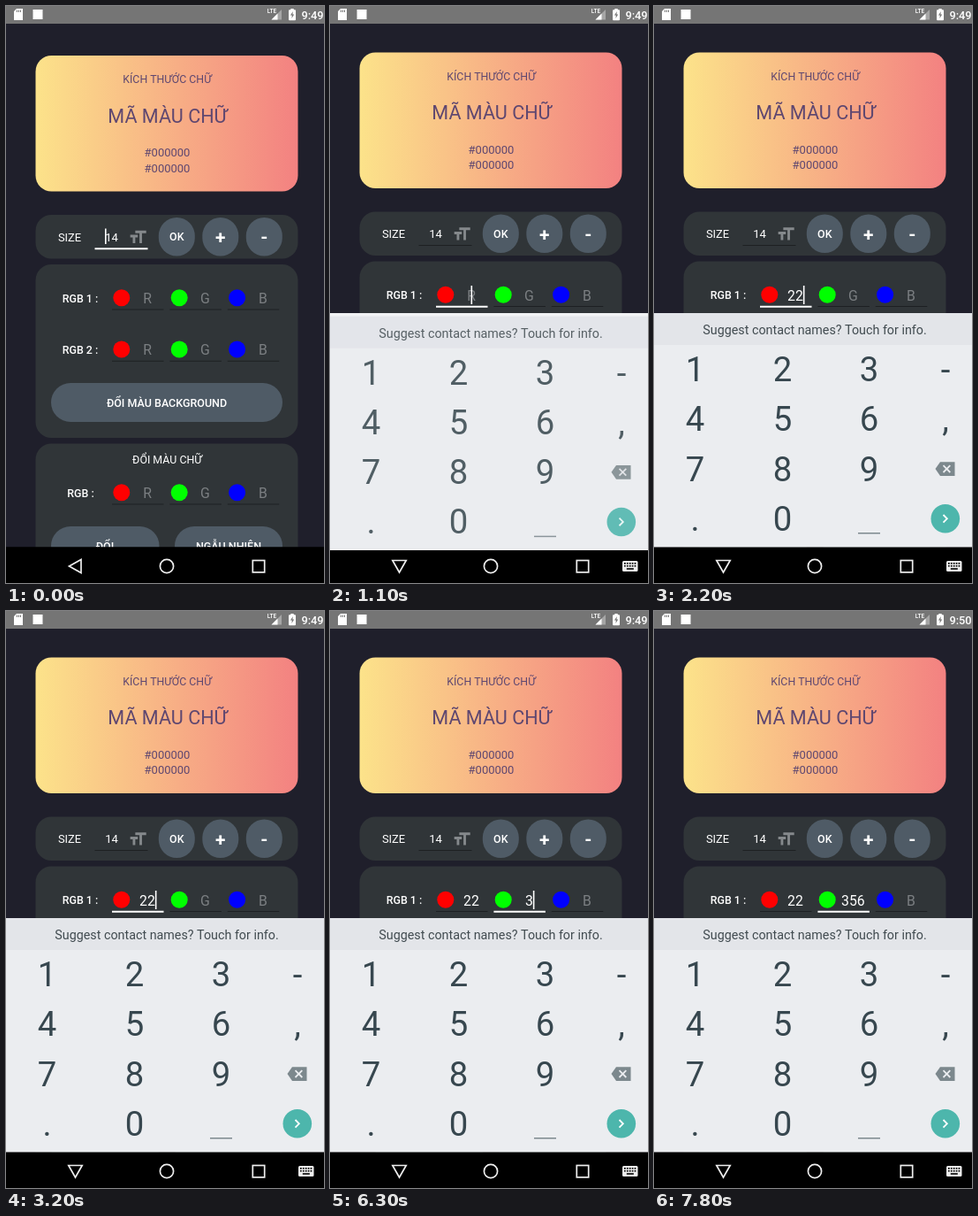
An HTML page with a canvas for the animation above (8000 ms loop, 360 by 652 pixels).

```html
<!DOCTYPE html>
<html lang="vi">
<head>
<meta charset="utf-8">
<style>
html, body { margin: 0; width: 100%; height: 100%; overflow: hidden; background: #1f1f2b; }
canvas { display: block; width: 360px; height: 652px; }
</style>
</head>
<body>
<canvas id="stage"></canvas>
<script>
const LOOP = 8000, STEP = 100;           // the screen refreshes ten times a second
const SLIDE_AT = 1034, SLIDE_FOR = 200;  // keyboard entrance
const canvas = document.getElementById('stage');
const dpr = window.devicePixelRatio || 1;
canvas.width = 360 * dpr;
canvas.height = 652 * dpr;
const c = canvas.getContext('2d');

const PANEL = '#303538', BUTTON = '#4f5b66', WHITE = '#fff', INK = '#37474f', PLUM = '#5f4770';
const KEYS = '#ebedf0';

// [time, focused field, R text, G text]; each one restarts the caret blink
const edits = [
  [0, 'size', '', ''], [1000, 'r', '', ''], [2000, 'r', '2', ''], [2200, 'r', '22', ''],
  [5600, 'g', '22', ''], [6300, 'g', '22', '3'], [6800, 'g', '22', '35'], [7100, 'g', '22', '356']
];
// [time, column, row]; a key stays lit for one step
const presses = [[1900, 1, 0], [2100, 1, 0], [6200, 2, 0], [6700, 1, 1], [7000, 2, 1]];

function box(x, y, w, h, color, r = 0) {
  c.fillStyle = color;
  c.beginPath();
  c.roundRect(x, y, w, h, r);
  c.fill();
}

function disc(x, y, r, color) {
  c.fillStyle = color;
  c.beginPath();
  c.arc(x, y, r, 0, 7);
  c.fill();
}

function poly(points, fill, stroke, width = 2, close = true) {
  c.beginPath();
  for (let i = 0; i < points.length; i += 2) c.lineTo(points[i], points[i + 1]);
  if (close) c.closePath();
  if (fill) { c.fillStyle = fill; c.fill(); }
  if (stroke) { c.strokeStyle = stroke; c.lineWidth = width; c.stroke(); }
}

// Centres the text on x and its capitals on y
function label(s, x, y, size, color = WHITE, weight = 400) {
  c.font = `${weight} ${size}px Roboto, sans-serif`;
  c.fillStyle = color;
  c.textAlign = 'center';
  c.fillText(s, x, y + size * 0.356);
  return c.measureText(s).width;
}

function underline(x, y, w, active) {
  if (active) box(x, y - 0.7, w, 2, WHITE);
  else box(x, y - 0.5, w, 1, '#1d2022');
}

function rgbRow(title, x, y, state) {
  label(title, x, y + 0.3, 12.4, WHITE, 500);
  ['r', 'g', 'b'].forEach((key, i) => {
    const left = 120 + i * 65.4, mid = left + 40;
    disc(left + 10.8, y - 0.3, 9.5, ['#f00', '#0f0', '#00f'][i]);
    const text = state && state[key];
    const active = state && state.focus === key;
    const w = label(text || key.toUpperCase(), mid, y + 0.4, 15.8, text ? WHITE : '#7b7f82');
    underline(left, y + 13, 58.5, active);
    if (active && state.caret) box(mid + (text ? w / 2 : -0.5), y - 10.5, 1.6, 21, WHITE);
  });
}

function page(state) {
  const grad = c.createLinearGradient(33, 0, 331, 0);
  grad.addColorStop(0, '#fce38a');
  grad.addColorStop(1, '#f38181');
  box(33.5, 56, 297, 153.5, grad, 18);
  label('KÍCH THƯỚC CHỮ', 182.5, 83, 12.3, PLUM);
  label('MÃ MÀU CHỮ', 183, 124, 21.6, PLUM);
  label('#000000', 182.5, 165.5, 13, PLUM);
  label('#000000', 182.5, 183, 13, PLUM);

  box(33.5, 236, 297, 49.5, PANEL, 18);
  label('SIZE', 72, 261, 12.9);
  label('14', 119.5, 261, 13.1);
  c.save();
  c.translate(137.8, 250);
  c.scale(0.95, 0.95);
  c.fillStyle = '#85898c';
  c.fill(new Path2D('M9 4v3h5v12h3V7h5V4H9zM3 12h3v7h3v-7h3V9H3z'));
  c.restore();
  const sizing = state.focus === 'size';
  underline(100.5, 274, 60, sizing);
  if (sizing && state.caret) box(112, 251.5, 1.6, 17.5, WHITE);
  ['OK', '+', '-'].forEach((s, i) => {
    const x = 193.3 + i * 49.5;
    box(x - 20.5, 239, 41, 43.5, BUTTON, 20.5);
    label(s, x, 261, i ? 21 : 12.4, WHITE, i ? 700 : 500);
  });

  box(33.5, 292, 297, 196, PANEL, 18);
  rgbRow('RGB 1 :', 84, 330, state);
  rgbRow('RGB 2 :', 84, 388.3);
  box(51, 426, 262, 44, BUTTON, 22);
  label('ĐỔI MÀU BACKGROUND', 182, 448.5, 12.5, WHITE, 500);

  box(33.5, 494.5, 297, 180, PANEL, 18);
  label('ĐỔI MÀU CHỮ', 182.5, 513, 12.4);
  rgbRow('RGB :', 84.5, 550);
  box(51, 588, 122.5, 44, BUTTON, 22);
  box(191, 588, 122, 44, BUTTON, 22);
  label('ĐỔI', 112, 610.5, 12.5, WHITE, 500);
  label('NGẪU NHIÊN', 252, 610.5, 12.5, WHITE, 500);
}

function statusBar(t) {
  box(0, 0, 360, 20, '#757575');
  poly([12, 3, 19, 3, 19, 16, 9, 16, 9, 6], WHITE);
  for (let i = 0; i < 3; i++) box(12 + i * 2, 4.5, 1, 2.5, '#757575');
  box(30.5, 4, 11, 11, WHITE);
  poly([312, 4, 312, 15.5, 300.5, 15.5], '#a6a6a6');
  poly([307.5, 8.5, 307.5, 15.5, 300.5, 15.5], WHITE);
  label('LTE', 301, 6, 6.6, WHITE, 500);
  box(320, 4.2, 8, 12, WHITE, 1);
  box(322.3, 3, 3.4, 2, WHITE);
  poly([324.8, 6, 322, 10.6, 323.8, 10.6, 323.4, 14, 326.2, 9.6, 324.4, 9.6], '#757575');
  label(t < 6700 ? '9:49' : '9:50', 347, 10, 12.8, WHITE, 500);
}

function navIcons(typing) {
  poly(typing ? [70.8, 626.5, 86.2, 626.5, 78.5, 640] : [71.5, 633, 85, 625.5, 85, 640.5], null, '#eee', 1.7);
  c.beginPath();
  c.arc(182, 633, 7.6, 0, 7);
  c.stroke();
  c.strokeRect(279.3, 626.5, 13.4, 13.4);
  if (!typing) return;
  box(331, 627, 17.5, 12, '#eee', 1.5);
  for (let i = 0; i < 10; i++) box(333 + i % 5 * 2.9, 629 + (i > 4) * 2.9, 1.7, 1.7, '#000');
  box(335.8, 635.2, 8, 1.6, '#000');
}

function keyboard(t) {
  const left = Math.max(0, 1 - (t - SLIDE_AT) / SLIDE_FOR) ** 5;
  const shift = 27 * left;
  box(0, 347, 360, 264.3 + shift, '#f1f2f4');
  c.save();
  c.translate(0, shift);
  c.globalAlpha = 1 - left;
  box(0, 347, 360, 264.3, KEYS);
  box(0, 347, 360, 36, '#e3e5e9');
  label('Suggest contact names? Touch for info.', 182, 366, 14.3, '#414b50');
  for (const [at, col, row] of presses)
    if (t >= at && t < at + STEP) box(col * 99, 388.5 + row * 56.2, 92, 43.5, '#d0d4d8');

  ['123-', '456,', '789', '.0'].forEach((keys, row) => [...keys].forEach((k, col) =>
    label(k, [46.5, 145.5, 243.5, 330][col], 410.5 + row * 56.2, 38.3, INK)));
  box(231, 595, 25, 1.5, '#7d898e');
  poly([318.5, 523, 324, 515.3, 340.5, 515.3, 340.5, 531, 324, 531], '#7c888d');
  poly([327.5, 519.2, 335.3, 527], null, KEYS, 1.8, false);
  poly([335.3, 519.2, 327.5, 527], null, KEYS, 1.8, false);
  disc(329.8, 579.3, 16.3, '#4db6ac');
  poly([327.5, 575, 331.8, 579.3, 327.5, 583.6], null, WHITE, 1.8, false);
  c.restore();
}

function draw(now) {
  const t = Math.floor(now % LOOP / STEP) * STEP;
  const [since, focus, r, g] = edits.filter(e => e[0] <= t).pop();
  const caret = Math.floor((t - since) / 500) % 2 === 0;
  const typing = t >= SLIDE_AT;

  c.setTransform(dpr, 0, 0, dpr, 0, 0);
  box(0, 0, 360, 652, '#1f1f2b');
  c.save();
  c.translate(0, typing ? -3.5 : 0);
  page({ focus, r, g, caret });
  c.restore();
  statusBar(t);
  box(0, 611.3, 360, 41, '#000');
  if (typing) keyboard(t);
  navIcons(typing);
}

const start = performance.now();
function tick() {
  draw(performance.now() - start);
  requestAnimationFrame(tick);
}
tick();
</script>
</body>
</html>
```
